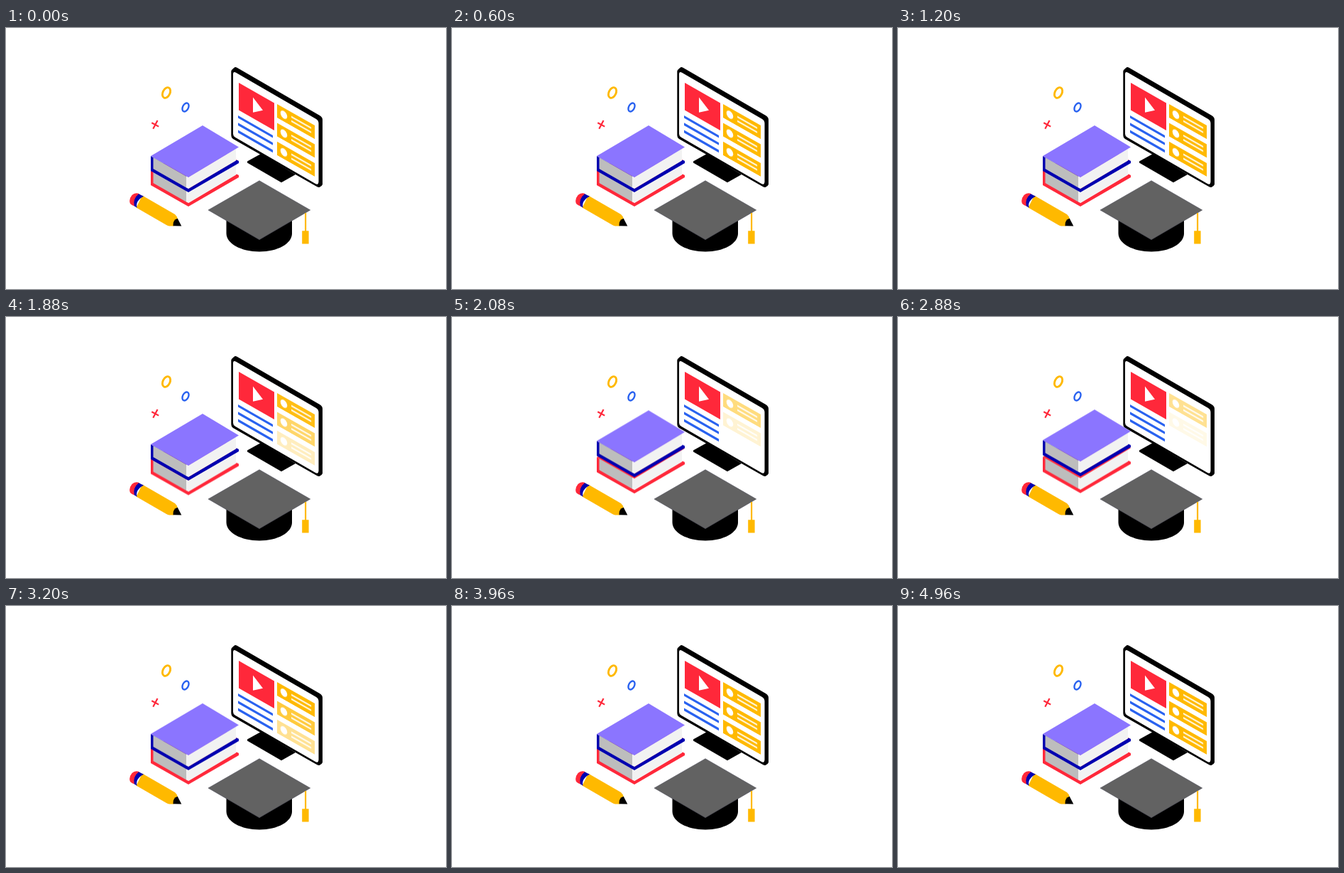
These frames come from a looping animation (620x367 px, 5000 ms). An HTML page:

```html
<!DOCTYPE html>
<html lang="en">
<head>
<meta charset="utf-8">
<title>Online learning</title>
<style>
  html, body { margin: 0; width: 100%; height: 100%; overflow: hidden; background: #fff; }
  svg { display: block; width: 620px; height: 367px; }

  .book { animation: lift 5s infinite; }
  .upper { --rise: -14px; --edge: #0000b0; --cover: #8b75ff; }
  .lower { --rise: -7px; --edge: #ff283a; --cover: #ff283a; }
  .edge { fill: var(--edge); }
  .cover { fill: var(--cover); }
  @keyframes lift {
    0%, 35%, 65%, 100% { transform: translateY(0); animation-timing-function: cubic-bezier(.364, 0, .636, 1); }
    50% { transform: translateY(var(--rise)); animation-timing-function: cubic-bezier(.364, 0, .636, 1); }
  }

  .card { animation: 5s linear infinite; }
  .c1 { animation-name: fade1; }
  .c2 { animation-name: fade2; }
  .c3 { animation-name: fade3; }
  /* last card leaves first and returns last */
  @keyframes fade1 { 0%, 36.9%, 63.1%, 100% { opacity: 1; } 46.5%, 53.5% { opacity: 0; } }
  @keyframes fade2 { 0%, 33.7%, 66.3%, 100% { opacity: 1; } 43.3%, 56.7% { opacity: 0; } }
  @keyframes fade3 { 0%, 30.5%, 69.5%, 100% { opacity: 1; } 40.1%, 59.9% { opacity: 0; } }
</style>
</head>
<body>
<svg viewBox="0 0 620 367" xmlns="http://www.w3.org/2000/svg">
  <defs>
    <g id="card">
      <rect width="53" height="19" fill="#ffb900"/>
      <g fill="#fff">
        <ellipse cx="9.5" cy="9.6" rx="4.7" ry="5.3"/>
        <rect x="20" y="5.4" width="28" height="2.1"/>
        <rect x="20" y="11.4" width="28" height="2.1"/>
      </g>
    </g>
    <g id="book">
      <path class="edge" d="M204 180L257 210V231L204 201Z"/>
      <path class="edge" d="M257 226L325 185.5L328 187V190L257 231Z"/>
      <path fill="#bdbdbd" d="M207.5 182L254 208.5V224.5L207.5 198Z"/>
      <path fill="#f2f2f2" d="M254 208L257 209.5L324 169.5V186.5L257 226L254 224.5Z"/>
      <path class="cover" d="M204 180L277 137L328 167.5L257 210Z"/>
    </g>
  </defs>

  <!-- monitor -->
  <path d="M340 187.5L359 177L408 206L388 217.3L340 189.5Z"/>
  <path d="M317.3 61Q317.3 59.5 318.5 58.5L321.5 55.7Q323 54.5 325.5 55.7L442 123Q446 125.5 446 129V220Q445.5 222 441.5 224Q439.5 224 437 222.5L320 156Q317.3 154.5 317.3 151Z"/>
  <path fill="#fff" d="M320 64.5Q320.3 60.7 324 62.7L437 128Q440.5 130.2 440.5 134V216Q440.2 221 436.5 219.2L323 153.7Q320 152 320 149Z"/>
  <path fill="#ff283a" d="M328 77L378 105.5V144L328 115.5Z"/>
  <path fill="#fff" d="M348 97.5L362 115.8L348 118.8Z"/>
  <g transform="matrix(1 .57 0 1 327 123)" fill="#2962f0">
    <rect width="49" height="3.6"/>
    <rect y="10.3" width="49" height="3.6"/>
    <rect y="20.6" width="49" height="3.6"/>
  </g>
  <g transform="matrix(1 .567 0 1 382 107)">
    <use class="card c1" href="#card"/>
    <use class="card c2" href="#card" y="26.4"/>
    <use class="card c3" href="#card" y="52.8"/>
  </g>

  <!-- books -->
  <g class="book lower"><use href="#book" y="20"/></g>
  <g class="book upper"><use href="#book"/></g>

  <!-- floating marks -->
  <g fill="none">
    <ellipse cx="226" cy="91" rx="5" ry="7.8" transform="rotate(26 226 91)" stroke="#ffb900" stroke-width="2.9"/>
    <ellipse cx="253" cy="111.5" rx="4" ry="6.4" transform="rotate(26 253 111.5)" stroke="#2962f0" stroke-width="2.4"/>
    <path d="M205.3 133.2L215.2 138.6M213.5 130L207.3 141.8" stroke="#ff283a" stroke-width="2.2"/>
  </g>

  <!-- pencil -->
  <path fill="#ffb900" d="M192 235.5L238 262Q241 264.5 242 268.5L236.5 278.5H230Q228 278 226 277L183.5 252.5Z"/>
  <path fill="#ff283a" d="M188 233.3Q182 230.8 177.5 235Q172.5 241 175 247Q177 249.3 181 250.5L184 242Z"/>
  <path fill="#0000b0" d="M187 233.2Q178.500 240 180.700 250.300L184.500 252.700Q182 243 194 236.800Z"/>
  <path d="M235.500 278.300Q234.500 270 241.700 267.800L247.300 278.500Z"/>

  <!-- graduation cap -->
  <path d="M310.500 268V289C310.500 303 331 314.500 357 314.500S403 303 403 289V268Z"/>
  <path fill="#626262" stroke="#4a4a58" stroke-width=".6" d="M285 256L357 214.700L428.700 256L357 297.700Z"/>
  <path fill="#ffb900" d="M421 260H423.200V285.300H426.600V303.500H417.200V285.300H421Z"/>
</svg>
</body>
</html>
```
